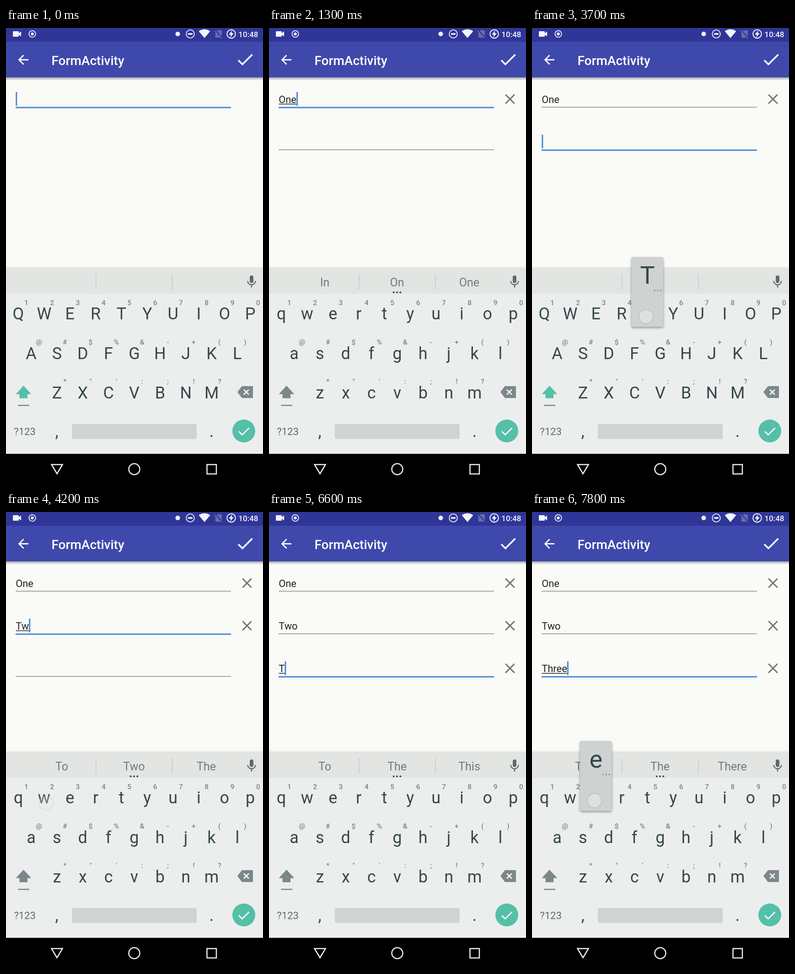
An HTML page with a canvas that plays this animation: 562x997 px, repeating every 8000 ms.

```html
<!DOCTYPE html>
<html lang="en">
<head>
<meta charset="utf-8">
<title>Form with growing rows</title>
<style>
html, body { margin: 0; width: 100%; height: 100%; overflow: hidden; background: #fafaf6; }
canvas { display: block; width: 562px; height: 997px; }
</style>
</head>
<body>
<canvas id="stage"></canvas>
<script>
const W = 562, H = 997, LOOP = 8000;
const canvas = document.getElementById('stage');
const ratio = window.devicePixelRatio || 1;
canvas.width = W * ratio;
canvas.height = H * ratio;
const g = canvas.getContext('2d');
g.scale(ratio, ratio);

const BLUE = '#4a88d6', GREEN = '#55bfa8', GREY = '#7c878a', INK = '#37474b';

// Each key row: letters, hints, x of the first key, vertical centre.
const KEYS = [
  ['QWERTYUIOP', '1234567890', 27, 624],
  ['ASDFGHJKL', '@#$%&-+()', 55, 710.5],
  ['ZXCVBNM', '*"\':;!?', 111.5, 796.5]
];
const PITCH = 56.35;

const START = { texts: ['', '', ''], row: 0, caps: true, key: '', words: [], cursor: true, fade: '' };
const STEPS = [
  [200, { key: 'O' }],
  [300, { texts: ['O', '', ''] }],
  [400, { key: '', caps: false }],
  [500, { words: ['Of', 'I', 'To'] }],
  [600, { key: 'N' }],
  [700, { texts: ['On', '', ''] }],
  [1000, { key: '', words: ['In', 'On', 'One'] }],
  [1100, { key: 'E' }],
  [1200, { texts: ['One', '', ''] }],
  [1300, { key: '' }],
  [1400, { words: ['Ones', 'Once', 'Gone'] }],
  [2500, { row: 1 }],
  [2600, { words: [], caps: true }],
  [3500, { cursor: false }],
  [3700, { key: 'T', cursor: true }],
  [3800, { texts: ['One', 'T', ''] }],
  [3900, { key: '', caps: false, words: ['To', 'The', 'This'] }],
  [4000, { key: 'W' }],
  [4100, { texts: ['One', 'Tw', ''] }],
  [4200, { key: '', fade: 'W', words: ['To', 'Two', 'The'] }],
  [4400, { fade: '' }],
  [4700, { key: 'O' }],
  [4800, { texts: ['One', 'Two', ''] }],
  [4900, { key: '', words: ['Tao', 'To', 'Too'] }],
  [5600, { cursor: false }],
  [5700, { row: 2, cursor: true }],
  [5800, { words: [], caps: true }],
  [6400, { key: 'T' }],
  [6500, { texts: ['One', 'Two', 'T'], caps: false }],
  [6600, { key: '', words: ['To', 'The', 'This'] }],
  [6800, { key: 'H' }],
  [6900, { texts: ['One', 'Two', 'Th'] }],
  [7000, { key: '' }],
  [7200, { key: 'R' }],
  [7300, { texts: ['One', 'Two', 'Thr'] }],
  [7400, { key: 'E', words: ['Then', 'The', 'There'] }],
  [7500, { texts: ['One', 'Two', 'Thre'] }],
  [7600, { key: '' }],
  [7700, { key: 'E' }],
  [7800, { texts: ['One', 'Two', 'Three'] }]
];

function stateAt(t) {
  return Object.assign({}, START, ...STEPS.filter(s => s[0] <= t).map(s => s[1]));
}

function rect(x, y, w, h, color) {
  g.fillStyle = color;
  g.fillRect(x, y, w, h);
}

function round(x, y, w, h, r, color) {
  g.beginPath();
  g.roundRect(x, y, w, h, r);
  g.fillStyle = color;
  g.fill();
}

function path(points, close) {
  g.beginPath();
  for (let i = 0; i < points.length; i += 2) g.lineTo(points[i], points[i + 1]);
  if (close) g.closePath();
}

function line(points, width, color, close) {
  path(points, close);
  g.lineWidth = width;
  g.strokeStyle = color;
  g.stroke();
}

function shape(points, color) {
  path(points, true);
  g.fillStyle = color;
  g.fill();
}

function disc(x, y, r, color) {
  g.beginPath();
  g.arc(x, y, r, 0, 7);
  g.fillStyle = color;
  g.fill();
}

function ring(x, y, r, width, color) {
  g.beginPath();
  g.arc(x, y, r, 0, 7);
  g.lineWidth = width;
  g.strokeStyle = color;
  g.stroke();
}

function text(s, x, y, size, color, align = 'center', weight = 400) {
  g.font = `${weight} ${size}px Roboto, sans-serif`;
  g.textAlign = align;
  g.fillStyle = color;
  g.fillText(s, x, y);
}

function cross(x, y, r, width, color) {
  line([x - r, y - r, x + r, y + r], width, color);
  line([x - r, y + r, x + r, y - r], width, color);
}

function dots(x, y, gap, r, color) {
  for (const i of [-1, 0, 1]) disc(x + i * gap, y, r, color);
}

function fadeDown(y, h, from, to) {
  const shade = g.createLinearGradient(0, y, 0, y + h);
  shade.addColorStop(0, from);
  shade.addColorStop(1, to);
  rect(0, y, W, h, shade);
}

function statusBar() {
  const white = '#f4f4fb';
  rect(0, 0, W, 30, '#303698');
  round(15, 7, 13, 12, 1.5, white);
  shape([27, 12, 33, 7.5, 33, 18.5, 27, 14], white);
  ring(57.5, 13, 7.2, 1.8, white);
  disc(57.5, 13, 3.2, white);
  disc(375.5, 13, 5, white);
  ring(403, 13, 8.8, 1.8, white);
  round(398, 11.3, 10, 3.4, 1, white);
  g.beginPath();
  g.moveTo(434, 22);
  g.lineTo(421.5, 7);
  g.quadraticCurveTo(434, -1.5, 446.5, 7);
  g.closePath();
  g.fillStyle = white;
  g.fill();
  const dim = '#686da8';
  shape([462, 5, 471, 5, 472, 6, 472, 21, 458, 21, 458, 9], dim);
  line([456, 4, 473, 22], 3.5, '#303698');
  line([455.5, 5.5, 472, 22.5], 1.6, dim);
  ring(492.5, 13, 9.3, 2, white);
  shape([494.5, 5.5, 487, 14.5, 491.5, 14.5, 490.5, 20.5, 498, 11.5, 493.5, 11.5], white);
  text('10:48', 551.5, 19.5, 17, white, 'right', 500);
}

function appBar() {
  rect(0, 30, W, 78, '#3f49ab');
  fadeDown(108, 7, 'rgba(40,40,60,.38)', 'rgba(40,40,60,0)');
  line([49, 69.5, 28.5, 69.5], 2.8, '#fff');
  line([38.5, 59.5, 28.5, 69.5, 38.5, 79.5], 2.8, '#fff');
  text('FormActivity', 99.5, 80.5, 28, '#fff', 'left', 500);
  line([508, 70.5, 517, 79.5, 538.5, 58], 3.6, '#fff');
}

function form(s) {
  const rows = Math.min(3, s.texts.filter(Boolean).length + 1);
  for (let i = 0; i < rows; i++) {
    const y = 93.2 * i, value = s.texts[i], focus = s.row === i;
    text(value, 21.2, 164 + y, 21.9, '#222', 'left');
    const width = g.measureText(value).width;
    if (focus) {
      rect(21, 172.4 + y, 471, 3, BLUE);
      if (value) rect(21.5, 165.6 + y, width, 1.5, '#222');
      if (s.cursor) rect(21.3 + width, 140 + y, 3, 30, BLUE);
    } else {
      rect(21, 172.3 + y, 471, 1.6, '#92938f');
    }
    if (value) cross(527, 155.4 + y, 9.8, 2.9, '#747472');
  }
}

function wordBar(words) {
  fadeDown(521, 6, 'rgba(200,204,200,0)', 'rgba(200,204,200,.6)');
  rect(0, 527, W, 54, '#e3e5e2');
  rect(196, 538, 1.3, 34, '#c2c7c5');
  rect(363, 538, 1.3, 34, '#c2c7c5');
  words.forEach((word, i) => text(word, 122 + 158 * i, 564.5, 25, '#737a7c'));
  const mic = '#5f6a6c';
  round(533, 541, 8, 16.5, 4, mic);
  g.beginPath();
  g.arc(537, 553, 8.5, 0, Math.PI);
  g.lineWidth = 2.3;
  g.strokeStyle = mic;
  g.stroke();
  rect(535.8, 561, 2.4, 6.5, mic);
}

function keyboard(s) {
  wordBar(s.words);
  rect(0, 581, W, 350, '#ebeeed');
  if (s.words.length) dots(280, 578, 7.3, 2.1, '#43494a');
  for (const [letters, hints, x0, y] of KEYS) {
    [...letters].forEach((letter, i) => {
      const x = x0 + i * PITCH;
      text(s.caps ? letter : letter.toLowerCase(), x, y + 13, 36, INK);
      text(hints[i], x + 17.3, y - 18.5, 15.5, '#7b8487', 'center', 500);
    });
  }
  const arrow = s.caps ? GREEN : GREY;
  shape([38.3, 782, 55.3, 800.5, 47, 800.5, 47, 809.5, 29.5, 809.5, 29.5, 800.5, 21.5, 800.5], arrow);
  rect(26.5, 823.8, 24.5, 2.6, GREY);
  shape([506, 796, 516, 783, 540, 783, 540, 809, 516, 809], GREY);
  cross(525.5, 796, 5.5, 2.6, '#f2f4f3');
  text('?123', 41, 890, 22, '#5f6b6e');
  text(',', 111, 893.5, 36, INK);
  text('.', 449.5, 893.5, 36, INK);
  round(144, 866, 273, 32.5, 4, '#cfd4d2');
  disc(520, 881, 25, GREEN);
  line([509, 882, 516.5, 889.5, 531.5, 874.5], 2.6, '#fff');
}

function place(key) {
  const [letters, , x0, y] = KEYS.find(row => row[0].includes(key));
  return [x0 + letters.indexOf(key) * PITCH, y];
}

function touch(x, y, alpha) {
  g.globalAlpha = alpha;
  disc(x, y, 15.5, 'rgba(232,236,236,.55)');
  ring(x, y, 15.5, 1.3, 'rgba(165,172,172,.6)');
  g.globalAlpha = 1;
}

function popup(s) {
  const [x, y] = place(s.key), top = Math.max(501, y - 128.5);
  g.save();
  g.shadowColor = 'rgba(0,0,0,.42)';
  g.shadowBlur = 5 * ratio;
  g.shadowOffsetY = 2 * ratio;
  round(x - 34.5, top, 69, y + 29.5 - top, 3, '#ced3d2');
  g.restore();
  text(s.caps ? s.key : s.key.toLowerCase(), x, top + 58, 54, INK);
  dots(x + 22.5, top + 73, 7, 1.8, '#8b9193');
  touch(x - 3, y + 7, 1);
}

function navBar() {
  rect(0, 931, W, 66, '#000');
  line([99.5, 954.5, 123.5, 954.5, 111.5, 974.5], 2.5, '#eee', true);
  ring(280.5, 964.5, 12, 2.5, '#eee');
  g.strokeRect(439.5, 954.5, 20.5, 20.5);
}

function draw(now) {
  const s = stateAt(now % LOOP);
  rect(0, 0, W, H, '#fafaf6');
  form(s);
  appBar();
  statusBar();
  keyboard(s);
  if (s.key) popup(s);
  if (s.fade) {
    const [x, y] = place(s.fade);
    touch(x + 4.5, y + 12, .5);
  }
  navBar();
  requestAnimationFrame(draw);
}
requestAnimationFrame(draw);
</script>
</body>
</html>
```
